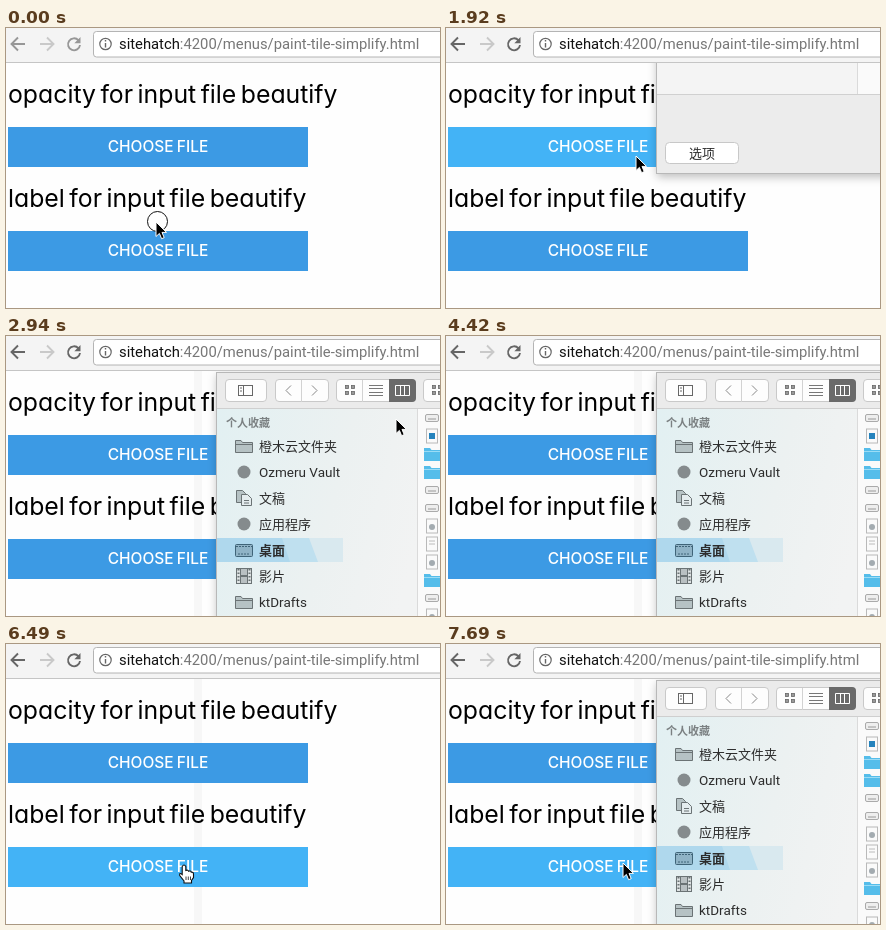
An HTML page that plays this animation: 434x280 px, repeating every 8 s.

```html
<!DOCTYPE html>
<html lang="en">
<head>
<meta charset="utf-8">
<title>File input demo</title>
<style>
  html, body { margin: 0; width: 100%; height: 100%; overflow: hidden; background: #fefefe; }
  svg { display: block; }
  .heading { font: 24.8px Inter, "Open Sans", sans-serif; font-feature-settings: "cv11"; font-optical-sizing: none; word-spacing: -2.5px; }
  .choose { font: 500 15.5px Inter, "Open Sans", sans-serif; font-optical-sizing: none; word-spacing: -1px; fill: #fff; text-anchor: middle; }
  .url { font: 14.8px Roboto, sans-serif; fill: #777; }
  .side { font: 13px "Noto Sans CJK SC", "Noto Sans CJK", sans-serif; fill: #2c2c2c; }
  .side.latin { font-family: Roboto, "Noto Sans CJK SC", sans-serif; font-size: 13.5px; }
  .group { font: bold 11px "Noto Sans CJK SC", "Noto Sans CJK", sans-serif; fill: #7b8082; }
  .line { fill: none; stroke: #666; }
</style>
</head>
<body>
<svg id="stage" width="434" height="280" viewBox="0 0 434 280"></svg>
<script>
const LOOP = 8000;
const SHEET_HEIGHT = 440;
const HIDDEN = -500;

// [start ms, x, y, shape] of the pointer tip
const pointer = [
  [0, 150, 194, 'ring'], [150, 150, 193, 'arrow'], [300, 152, 186, 'arrow'],
  [450, 160, 173, 'arrow'], [600, 170, 159, 'arrow'], [720, 182, 146, 'arrow'],
  [870, 190, 137, 'hand'], [1020, 194, 132, 'hand'], [1170, 190, 128, 'hand'],
  [1620, 190, 128, 'arrow'], [2500, 215, 122, 'arrow'], [2650, 254, 112, 'arrow'],
  [2790, 320, 100, 'arrow'], [2940, 390, 83, 'arrow'], [3240, 422, 100, 'arrow'],
  [3390, 420, 135, 'arrow'], [3540, 400, 160, 'arrow'], [3680, 330, 160, 'arrow'],
  [3820, 240, 158, 'arrow'], [3970, 160, 155, 'arrow'], [4120, 118, 154, 'arrow'],
  [4420, 0, 0, 'none'], [5910, 286, 188, 'arrow'], [6060, 250, 206, 'hand'],
  [6200, 215, 216, 'hand'], [6340, 188, 219, 'hand'], [6490, 178, 221, 'hand'],
  [6940, 177, 219, 'arrow']
];

// [start ms, vertical offset of the sheet]
const slide = [
  [0, HIDDEN], [1770, -410], [1920, -330], [2070, -170], [2200, -40], [2350, 0],
  [5320, -150], [5460, -413], [5610, HIDDEN],
  [7090, -390], [7240, -180], [7390, -35], [7540, 0]
];

const at = (track, t) => track.findLast(key => key[0] <= t);
const within = (t, from, to) => t >= from && t < to;
const box = (x, y, w, h, fill, extra = '') =>
  `<rect x="${x}" y="${y}" width="${w}" height="${h}" fill="${fill}" ${extra}/>`;
const line = (d, extra = '') => `<path class="line" d="${d}" ${extra}/>`;
const word = (cls, x, y, content, extra = '') =>
  `<text class="${cls}" x="${x}" y="${y}" ${extra}>${content}</text>`;
const place = (x, y, content) => `<g transform="translate(${x} ${y})">${content}</g>`;
const group = (id, content) => `<g id="${id}">${content}</g>`;
const control = (x, w) => box(x + .5, 43.5, w, 22, '#fdfdfd', 'rx="3.5" stroke="#c9c9c9"');

// Sidebar icons, centred on 0,0
const ink = 'stroke="#6b7375"';
const icons = {
  folder: `<path d="M-8.5-5.500h5.500l1.500 2H8.500V6.500h-17z" fill="#b6c2c4" ${ink}/><path d="M-8.500-1.500H8.500" ${ink}/>`,
  disc: '<circle r="6.5" fill="#858b8d"/>',
  papers: `<path d="M-7.5-7.500H-1.500L1.500-4.500V4.500H-7.500z" fill="#b6c2c4" ${ink}/>
    <path d="M-2.500-3.500H3.500L7.500 .5V7.500H-2.500z" fill="#e4ecee" ${ink}/><path d="M0 2.500H5M0 5H5" ${ink}/>`,
  desk: box(-8.5, -5.5, 17, 12, '#8fb3c6', 'rx="1" stroke="#3f6478"') +
    '<path d="M-8-3.500H8M-6 4H6" stroke="#3f6478" stroke-dasharray="2 1"/>',
  film: box(-7.5, -7.5, 15, 15, '#dde2e3', ink) + box(-3.5, -7.5, 7, 7, '#b9c0c2', ink) + box(-3.5, .5, 7, 7, '#b9c0c2', ink) +
    `<path d="M-5.500-7V8M5.500-7V8" ${ink} stroke-width="2" stroke-dasharray="1.500 2"/>`,
  camera: `<path d="M-8.500-3.500h4l2-3h5l2 3h4V6.500h-17z" fill="#b5b5b5" ${ink}/>
    <circle cy="1" r="4" fill="#e0e0e0" ${ink}/><circle cy="1" r="2" fill="#8b8b8b"/>`,
  note: `<path d="M-3 5V-6L6-8V3" fill="none" ${ink} stroke-width="1.500"/>
    <circle cx="-5" cy="5" r="2.500" fill="#777"/><circle cx="4" cy="3" r="2.500" fill="#777"/>`
};

// File list icons, centred on 0,0
const sheetOfPaper = box(-5.5, -7, 11, 14, '#fafafa', 'stroke="#b9b9b9"');
const files = {
  drive: box(-6.5, -3.5, 13, 7, '#eee', 'rx="1.5" stroke="#aaa"') + '<path d="M-4 1H4" stroke="#999"/>',
  folder: '<path d="M-8-6h6l1.500 2H8V7H-8z" fill="#55bdea"/><path d="M-8-2.500H8" stroke="#9bdcf5"/>',
  page: sheetOfPaper + '<path d="M-3-3H3M-3 0H3" stroke="#bbb"/>',
  script: sheetOfPaper + '<circle cy="1" r="3" fill="#a3abb0"/>',
  blue: sheetOfPaper + box(-3, -3, 6, 6, '#2583bd')
};

const entry = (icon, label, y, extra = '') =>
  place(238, y, icons[icon]) + word(/[a-z]/.test(label) ? 'side latin' : 'side', 253, y + 5, label, extra);

function browserBar() {
  const thick = 'stroke-width="1.9"';
  return box(0, 0, 434, 34, '#f4f4f4') + box(0, 34, 434, 1, '#c5c5c5') +
    box(87.5, 3.5, 360, 25.5, '#fff', 'rx="3" stroke="#b4b4b4"') +
    group('navigation',
      line('M19 16H6M12 9.500L5.500 16L12 22.500', thick) +
      line('M72.500 12.300A6 6 0 1 0 74 17', thick) +
      '<path d="M74.500 9V15.200H68.300z" fill="#666"/>') +
    line('M34 16H47M41 9.500L47.500 16L41 22.500', `${thick} style="stroke:#c9c9c9"`) +
    '<circle class="line" cx="99.5" cy="16" r="5.7" stroke-width="1.2"/>' +
    line('M99.500 15V19.500M99.500 12V13.500', 'stroke-width="1.4"') +
    word('url', 113, 21, '<tspan fill="#111">sitehatch</tspan>:4200/menus/paint-tile-simplify.html');
}

function uploadRow(id, title, y) {
  return word('heading', 2, y - .5, title) + box(2, y + 24, 300, 40, '#3c9ae4', `id="${id}"`) +
    word('choose', 152, y + 49, 'CHOOSE FILE');
}

function sheetTools() {
  const cell = (x, y) => box(x + .5, y + .5, 3, 3, '#999', 'stroke="#666" stroke-width=".8"');
  const grid = cell(0, 0) + cell(6, 0) + cell(0, 6) + cell(6, 6);
  const divider = 'style="stroke:#d2d2d2"';
  return control(219, 41) + box(232.5, 49.5, 14, 10, 'none', 'stroke="#666"') +
    line('M237.500 49V60M234 52H236M234 55H236') +
    control(269, 53) + line('M295.500 44V66', divider) +
    line('M285 49.500L280 54.500L285 59.500M306 49.500L311 54.500L306 59.500', 'style="stroke:#888"') +
    control(330, 79) + line('M356.500 44V66', divider) + place(339, 49, grid) +
    line('M363 49.500H377M363 52.500H377M363 56.500H377M363 59.500H377', 'style="stroke:#777"') +
    '<path id="columns" d="M383 43H406Q410 43 410 47V62Q410 66 406 66H383z"/>' +
    '<path id="columnIcon" d="M389.500 49.500H403.500V59.500H389.500zM394.500 49.500V59.500M398.500 49.500V59.500" fill="none"/>' +
    control(417, 40) + place(426, 49, grid);
}

function sheetList() {
  const names = ['drive', 'blue', 'folder', 'folder', 'drive', 'drive', 'script', 'page', 'script', 'folder', 'drive', 'script'];
  return box(211, 73, 200, 323, 'url(#tint)') +
    box(211, 202, 126, 24, '#d9e9ef') + '<path d="M211 202H303L312 226H211z" fill="#bfe0ef"/>' +
    '<path d="M211 202H276L284 226H211z" fill="#afd8ed"/>' +
    word('group', 220, 91, '个人收藏') +
    entry('folder', '橙木云文件夹', 110) + entry('disc', 'Ozmeru Vault', 136) + entry('papers', '文稿', 162) +
    entry('disc', '应用程序', 188) + entry('desk', '桌面', 214, 'style="font-weight:bold"') +
    entry('film', '影片', 240) + entry('folder', 'ktDrafts', 266) +
    names.map((name, i) => place(426, 82 + i * 18, files[name])).join('');
}

function sheet() {
  const bottom = 36 + SHEET_HEIGHT;
  return box(211, 36, 240, SHEET_HEIGHT, '#fafafa', 'filter="url(#shadow)"') +
    box(211, 72, 200, 324, '#f4f4f4') +
    group('bare', entry('note', '音乐', 72) + entry('camera', '照片', 98) + entry('film', '影片', 124)) +
    group('list', sheetList()) + box(411, 73, 1, 323, '#dadada') +
    box(211, 36, 240, 36, '#ebebeb', 'id="toolbar"') + box(211, 72, 240, 1, '#cfcfcf') +
    group('tools', sheetTools()) +
    box(211, bottom - 80, 240, 80, '#ececec') + box(211, bottom - 80, 240, 1, '#d0d0d0') +
    box(219.5, bottom - 31.5, 73, 21, '#fff', 'rx="4" stroke="#c8c8c8"') +
    word('side', 256, bottom - 16, '选项', 'text-anchor="middle"') +
    box(210.5, 36.5, 240, SHEET_HEIGHT - 1, 'none', 'stroke="#b8b8b8"');
}

const arrow = '<path d="M0 0V14.500L3.400 11.400L5.600 16.700L8.200 15.600L6 10.400H10.500z" fill="#000" stroke="#fff"/>';
const hand = `<path d="M-1.800 1.500Q0-1.500 1.800 1.500V5.500Q4 4.500 4.600 6.200Q6.700 5.500 7.200 7.200Q9.500 6.800 9.500 9V12.500L7.500 15.500V18H0V16
  L-4.300 10.500Q-4.800 7 -1.800 9.500z" fill="#fff" stroke="#111" stroke-width="1.1"/>
  <path d="M2 11.500V15M4.300 11.500V15M6.500 11.500V15" stroke="#111" stroke-width=".8"/>`;

document.getElementById('stage').innerHTML = `
  <defs>
    <filter id="shadow" x="-20%" y="-10%" width="140%" height="120%">
      <feDropShadow dx="0" dy="3" stdDeviation="5" flood-color="#000" flood-opacity=".26"/>
    </filter>
    <linearGradient id="tint" x2="1" y2=".4">
      <stop stop-color="#e2f0f2"/><stop offset=".6" stop-color="#ecf1f1"/><stop offset="1" stop-color="#f2f3f3"/>
    </linearGradient>
    <clipPath id="page">${box(0, 35, 434, 245, '#000')}</clipPath>
  </defs>
  ${box(0, 0, 434, 280, '#fefefe')}
  ${box(188, 35, 8, 245, '#f7f7f7', 'id="stripe"')}
  ${uploadRow('first', 'opacity for input file beautify', 75)}
  ${uploadRow('second', 'label for input file beautify', 179)}
  <g clip-path="url(#page)">${group('sheet', sheet())}</g>
  ${browserBar()}
  <g id="pointer">
    <circle id="ring" cx="1.5" cy="-.5" r="10" fill="#fff" stroke="#111"/>
    ${group('arrow', arrow)}${group('hand', hand)}
  </g>`;

const el = id => document.getElementById(id);
const set = (id, name, value) => el(id).setAttribute(name, value);
const show = (id, visible) => set(id, 'visibility', visible ? 'visible' : 'hidden');
const light = (id, on) => set(id, 'fill', on ? '#43b3f6' : '#3c9ae4');

function draw(t) {
  const [, x, y, shape] = at(pointer, t);
  const offset = at(slide, t)[1];
  const open = offset > HIDDEN;
  const loaded = within(t, 2500, 5610) || t >= 7690;
  set('navigation', 'opacity', t < 150 ? .65 : 1);
  set('pointer', 'transform', `translate(${x} ${y})`);
  show('ring', shape === 'ring');
  show('arrow', shape === 'arrow' || shape === 'ring');
  show('hand', shape === 'hand');
  set('sheet', 'transform', `translate(0 ${offset})`);
  show('sheet', open);
  show('list', open && loaded);
  show('bare', open && !loaded);
  set('toolbar', 'fill', loaded ? '#ebebeb' : '#f4f4f4');
  set('tools', 'opacity', loaded ? 1 : .55);
  set('columns', 'fill', loaded ? '#6a6a6a' : '#d2d2d2');
  set('columnIcon', 'stroke', loaded ? '#fff' : '#666');
  show('stripe', t >= 2500);
  light('first', within(t, 870, 2500));
  light('second', t >= 6060);
}

const start = performance.now();
function tick() {
  draw((performance.now() - start) % LOOP);
  requestAnimationFrame(tick);
}
tick();
</script>
</body>
</html>
```
